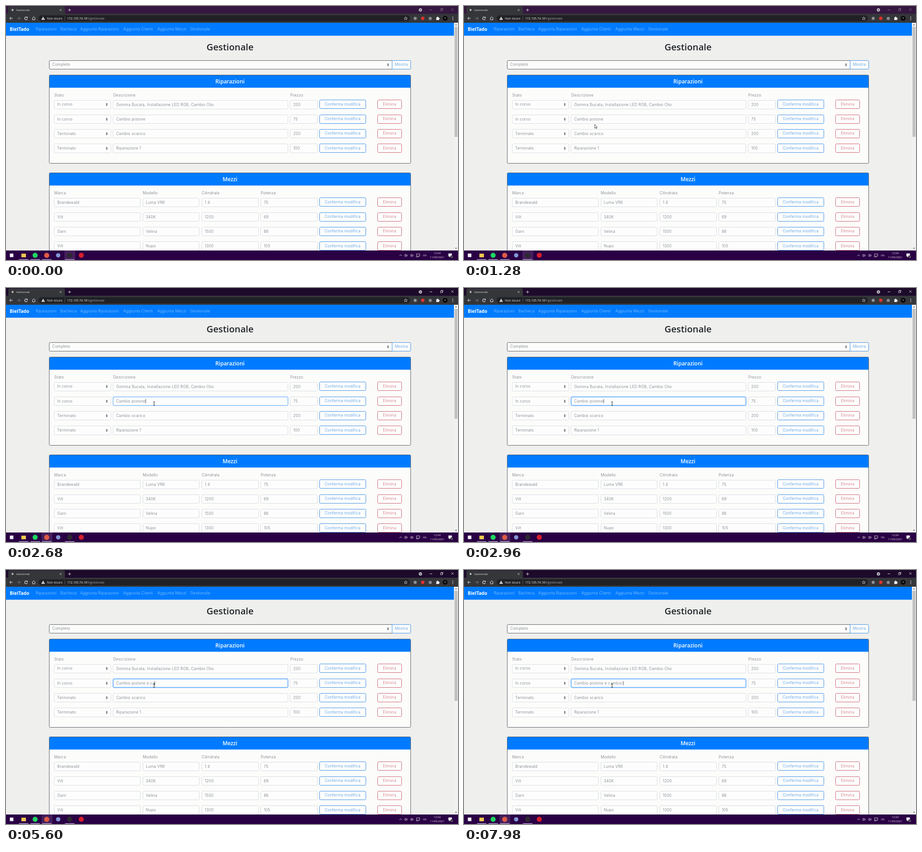
An HTML page with a canvas for the animation above (8000 ms loop, 998 px wide and 561 px high).

```html
<!DOCTYPE html>
<html lang="it">
<head>
<meta charset="utf-8">
<title>Gestionale</title>
<style>
html, body { margin: 0; width: 100%; height: 100%; overflow: hidden; background: #efefed; }
canvas { display: block; width: 998px; height: 561px; }
</style>
</head>
<body>
<canvas id="stage" width="998" height="561"></canvas>
<script>
const ctx = document.getElementById('stage').getContext('2d');
const LOOP = 8000;
const BODY = '300 8.4px Inter, sans-serif';
const HEAD = '"Open Sans", sans-serif';
const UI = '"Open Sans", sans-serif';
const BLUE = '#007bff', LINK = '#3f90e2', RED = '#cc6570', INK = '#6b7178', LINE = '#d9dcdf';
const ROWS = [217.5, 250, 282, 314.3];
const MID = [433.5, 466, 498, 530.3];
const FIELD = { x: 236.5, w: 385.5 };

const repairs = [
  ['In corso', 'Gomma Bucata, Installazione LED RGB, Cambio Olio', '200'],
  ['In corso', 'Cambio pistone', '75'],
  ['Terminato', 'Cambio scarico', '200'],
  ['Terminato', 'Riparazione 1', '100']
];
const vehicles = [
  ['Brandewald', 'Luma VRK', '1.4', '75'],
  ['Vilt', '340K', '1200', '69'],
  ['Garn', 'Velina', '1500', '86'],
  ['Vilt', 'Nupo', '1300', '105']
];
const vehicleCols = [[106.5, 190], [302, 124.5], [432, 125], [562.5, 124.5]];

// Times at which each typed letter appears.
const typed = ' e cambio ';
const keyTimes = [4040, 4340, 4760, 5440, 5600, 6300, 6720, 7000, 7440, 7980];
// Pointer stops: time, x, y.
const path = [[20, 140, 549], [820, 226, 283], [1280, 288.5, 261.5], [1560, 320, 254], [1980, 327, 255.5]];

const clamp = v => Math.max(0, Math.min(1, v));
const snap = v => Math.floor(v) + 0.5;

function text(str, x, y, font = BODY, color = INK, align = 'left', spacing = font === BODY ? 0.28 : 0) {
  ctx.font = font;
  ctx.letterSpacing = spacing + 'px';
  ctx.fillStyle = color;
  ctx.textAlign = align;
  ctx.fillText(str, x, y);
}

function rect(x, y, w, h, color) {
  ctx.fillStyle = color;
  ctx.fillRect(x, y, w, h);
}

// Outlined boxes sit on whole pixels so their lines stay crisp.
function box(x, y, w, h, fill, stroke, r = 2, lw = 1) {
  ctx.beginPath();
  if (stroke) {
    const left = snap(x), top = snap(y);
    ctx.roundRect(left, top, snap(x + w) - left, snap(y + h) - top, r);
  } else {
    ctx.roundRect(x, y, w, h, r);
  }
  if (fill) { ctx.fillStyle = fill; ctx.fill(); }
  if (stroke) { ctx.strokeStyle = stroke; ctx.lineWidth = lw; ctx.stroke(); }
}

function dot(x, y, r, color) {
  ctx.beginPath();
  ctx.arc(x, y, r, 0, 7);
  ctx.fillStyle = color;
  ctx.fill();
}

function poly(points, fill, stroke, lw = 1) {
  ctx.beginPath();
  points.forEach(([x, y], i) => i ? ctx.lineTo(x, y) : ctx.moveTo(x, y));
  if (fill) { ctx.closePath(); ctx.fillStyle = fill; ctx.fill(); }
  if (stroke) { ctx.strokeStyle = stroke; ctx.lineWidth = lw; ctx.stroke(); }
}

function arc(x, y, r, from, to, color, lw = 1) {
  ctx.beginPath();
  ctx.arc(x, y, r, from, to);
  ctx.strokeStyle = color;
  ctx.lineWidth = lw;
  ctx.stroke();
}

function cross(x, y, r, color, lw) {
  poly([[x - r, y - r], [x + r, y + r]], null, color, lw);
  poly([[x + r, y - r], [x - r, y + r]], null, color, lw);
}

function input(x, w, mid, value) {
  box(x, mid - 9.5, w, 19.2, '#fdfdfd', LINE);
  text(value, x + 6.7, mid + 3);
}

function selectMark(x, y) {
  poly([[x - 2, y - 0.6], [x, y - 3], [x + 2, y - 0.6]], '#343a40');
  poly([[x - 2, y + 0.8], [x, y + 3.2], [x + 2, y + 0.8]], '#343a40');
}

function button(x, w, mid, label, color) {
  box(x, mid - 9.8, w, 19, '#fdfdfd', color);
  text(label, x + w / 2, mid + 2.4, BODY, color, 'center');
}

function rowButtons(mid) {
  button(692.5, 101.5, mid, 'Conferma modifica', LINK);
  button(820.5, 53, mid, 'Elimina', RED);
}

function card(y, h, title) {
  box(95.8, y, 798, h, '#fcfcfb', '#5a6066', 2);
  rect(96, y + 0.5, 797, 27.5, BLUE);
  text(title, 494.5, y + 18, '600 12px ' + HEAD, '#fff', 'center');
}

function drawTabs(active) {
  rect(0, 0, 998, 18, active ? '#1d0a2b' : '#35183f');
  box(5, 1, 125, 18, '#35363a', null, [4, 4, 0, 0]);
  dot(14.5, 8.7, 2.2, '#b9babd');
  text('Gestionale', 22.5, 11, '6px ' + UI, '#e4e5e7');
  cross(120.5, 8.8, 2, '#dfe0e2', 0.8);
  poly([[137, 8.8], [143.5, 8.8]], null, '#d5d2da');
  poly([[140.3, 5.6], [140.3, 12]], null, '#d5d2da');
  const tone = active ? '#f2f0f4' : '#877a8e';
  dot(915, 8.7, 3.6, '#bfbcc4');
  poly([[913.3, 8], [916.7, 8], [915, 10.2]], '#17101f');
  poly([[935.5, 8.5], [940.8, 8.5]], null, tone, 0.9);
  box(959.8, 6.2, 3.8, 3.8, null, tone, 0, 0.8);
  poly([[961, 6], [961, 5], [964.7, 5], [964.7, 8.8], [963.8, 8.8]], null, tone, 0.7);
  cross(985.7, 7.7, 2.5, tone, 0.8);
}

function drawToolbar() {
  rect(0, 17, 998, 20, '#35363a');
  box(72, 20.5, 820, 13.5, '#202124', null, 7);
  const light = '#e8e9eb';
  poly([[14.8, 27.2], [8.2, 27.2]], null, light);
  poly([[11.2, 24], [8, 27.2], [11.2, 30.4]], null, light);
  poly([[24.8, 27.2], [31.4, 27.2]], null, '#85868a');
  poly([[28.4, 24], [31.6, 27.2], [28.4, 30.4]], null, '#85868a');
  arc(44.3, 27.3, 3, 0.4, 5.5, light, 1.1);
  poly([[44.8, 26.6], [48, 26.6], [48, 23.5]], light);
  poly([[57.4, 27.4], [61.2, 23.8], [65, 27.4]], null, light);
  poly([[58.7, 27], [58.7, 30.6], [63.7, 30.6], [63.7, 27]], null, light);
  poly([[78, 30.5], [82, 23.6], [86, 30.5]], '#eceded');
  rect(81.6, 26, 0.9, 2.2, '#202124');
  rect(81.6, 28.8, 0.9, 0.9, '#202124');
  text('Non sicuro', 90.3, 29.6, '6.8px ' + UI, '#e8e9eb');
  rect(129.5, 23, 0.8, 8.5, '#6a6b6f');
  text('172.105.74.181', 135, 29.6, '6.75px ' + UI, '#f1f1f2');
  const hostWidth = ctx.measureText('172.105.74.181').width;
  text('/gestionale', 135 + hostWidth, 29.6, '6.75px ' + UI, '#a2a4a8');
  const star = [];
  for (let i = 0; i <= 10; i++) {
    const a = -Math.PI / 2 + i * Math.PI / 5, r = i % 2 ? 1.7 : 3.8;
    star.push([882.6 + r * Math.cos(a), 27.5 + r * Math.sin(a)]);
  }
  poly(star, null, '#d8d9db', 0.8);
  dot(903.5, 27.3, 3.4, '#8d9299');
  dot(920.2, 27.3, 3.7, '#e0332d');
  dot(936.7, 27.5, 3.5, '#85888d');
  rect(950, 25.2, 6, 5.8, light);
  dot(953, 24.9, 1.4, light);
  dot(956.2, 28, 1.4, light);
  dot(969.6, 27.2, 5.4, '#08080a');
  dot(969.6, 26.6, 1.2, '#b0aaa8');
  for (const y of [24.2, 27.2, 30.2]) dot(986.5, y, 0.85, light);
}

function drawPage() {
  rect(0, 37, 989, 504, '#efefed');
  rect(0, 37, 989, 28.6, BLUE);
  text('BielTado', 8.3, 55, '700 10.2px ' + HEAD, '#fff');
  const nav = { Riparazioni: 65.7, Bacheca: 120, 'Aggiunta Riparazioni': 164, 'Aggiunta Clienti': 259, 'Aggiunta Mezzi': 334.3, Gestionale: 406.8 };
  for (const label in nav) text(label, nav[label], 54, BODY, 'rgba(255,255,255,.6)');
  text('Gestionale', 494.7, 98, '600 20.2px ' + HEAD, '#212529', 'center');

  box(95.8, 120.5, 756.5, 19, '#fcfcfb', '#5a6066', [2, 0, 0, 2]);
  text('Completo', 102, 132.4);
  selectMark(843.5, 129.8);
  box(852.3, 120.5, 41.5, 19, '#fcfcfb', LINK, [0, 2, 2, 0]);
  text('Mostra', 873, 132.4, BODY, LINK, 'center');

  card(152.5, 195, 'Riparazioni');
  text('Stato', 106.5, 200.2);
  text('Descrizione', 236.8, 200.2);
  text('Prezzo', 627.7, 200.2);
  repairs.forEach(([state, job, price], i) => {
    const mid = ROWS[i];
    box(106.5, mid - 9.5, 124.5, 19.2, '#fdfdfd', LINE);
    text(state, 113, mid + 2.5);
    selectMark(222.5, mid);
    input(FIELD.x, FIELD.w, mid, i === 1 ? '' : job);
    input(627.5, 59.5, mid, price);
    rowButtons(mid);
  });

  card(368.5, 200, 'Mezzi');
  ['Marca', 'Modello', 'Cilindrata', 'Potenza'].forEach((label, c) => text(label, vehicleCols[c][0], 416.2));
  vehicles.forEach((row, i) => {
    row.forEach((value, c) => input(...vehicleCols[c], MID[i], value));
    rowButtons(MID[i]);
  });

  rect(989, 37, 9, 504, '#f1f1f1');
  rect(990.3, 46, 6.6, 243, '#c1c1c1');
  poly([[991.3, 42.6], [993.6, 40.2], [995.9, 42.6]], '#55585b');
  poly([[991.3, 534.2], [993.6, 536.6], [995.9, 534.2]], '#55585b');
}

function speaker(x) {
  poly([[x - 3.6, 549.8], [x - 2.2, 549.8], [x - 0.2, 548], [x - 0.2, 553.8], [x - 2.2, 552], [x - 3.6, 552]], null, '#e9e6ed', 0.8);
  arc(x, 550.9, 1.6, -0.9, 0.9, '#e9e6ed', 0.7);
  arc(x, 550.9, 3.2, -0.9, 0.9, '#e9e6ed', 0.7);
}

function drawTaskbar(active) {
  rect(0, 540, 998, 21, '#2a0045');
  rect(active ? 78.5 : 129, 540, 24, 21, 'rgba(255,255,255,.12)');
  for (const x of [28.5, 54, 79.5, 130]) rect(x, 559.3, 21, 1.7, '#a68abf');
  rect(8.5, 546.8, 7.8, 7.8, '#f3f1f5');
  rect(34, 547, 10, 8, '#f2c84f');
  dot(64.3, 550.6, 5.6, '#1ed760');
  dot(89.9, 550.7, 5.7, '#dd5a45');
  dot(115.2, 550.7, 4.8, '#8296d6');
  dot(140.5, 550.6, 5.8, '#2c2930');
  dot(166.2, 550.5, 5.6, '#d51f2c');

  const light = '#e9e6ed', small = '6px ' + UI;
  poly([[868.8, 552], [871.4, 549.4], [874, 552]], null, light, 0.9);
  speaker(883);
  speaker(896);
  box(906.2, 547.7, 7, 4.8, null, light, 0, 0.8);
  poly([[905.2, 554.2], [910.8, 554.2]], null, light, 0.8);
  text('ITA', 920.3, 553, small, light);
  text('12:54', 952, 548, small, light, 'center');
  text('11/05/2021', 952, 557.2, small, light, 'center');
  box(976.8, 546.5, 7.8, 6.6, light, null, 0.5);
  poly([[979, 553], [982, 553], [979, 555.3]], light);
  dot(984.6, 554, 3.3, '#2a1c37');
  text('2', 984.6, 556, '5.5px ' + UI, '#fff', 'center');
}

function drawField(t) {
  const mid = ROWS[1], left = FIELD.x + 6.7;
  const focus = clamp((t - 2580) / 300);
  if (focus > 0) {
    box(FIELD.x, mid - 9.5, FIELD.w, 19.2, null, `rgba(0,123,255,${0.25 * focus})`, 3, 3);
    box(FIELD.x, mid - 9.5, FIELD.w, 19.2, null, `rgba(98,172,255,${clamp(focus * 2 + 0.2)})`);
  }
  const count = keyTimes.filter(k => t >= k).length;
  const value = repairs[1][1] + typed.slice(0, count);
  text(value, left, mid + 3);
  if (t >= 2560) rect(Math.round(left + ctx.measureText(value).width - 0.4), mid - 4.5, 0.9, 9, '#33383d');
}

function drawPointer(t) {
  if (t < path[0][0]) return;
  let [, x, y] = path[path.length - 1];
  for (let i = 1; i < path.length; i++) {
    const [t0, x0, y0] = path[i - 1], [t1, x1, y1] = path[i];
    if (t < t1) {
      const p = (t - t0) / (t1 - t0);
      x = x0 + (x1 - x0) * p;
      y = y0 + (y1 - y0) * p;
      break;
    }
  }
  const overText = x > FIELD.x && x < FIELD.x + FIELD.w && ROWS.some(mid => Math.abs(y - mid) < 10);
  if (overText) {
    poly([[x, y - 4], [x, y + 4]], null, '#202326', 1);
    for (const dy of [-4, 4]) poly([[x - 2, y + dy], [x + 2, y + dy]], null, '#202326', 0.8);
  } else {
    const shape = [[0, 0], [0, 8.3], [1.9, 6.6], [3.2, 9.6], [4.5, 9], [3.2, 6.2], [5.7, 6], [0, 0]];
    poly(shape.map(([dx, dy]) => [x + dx, y + dy]), '#fff', '#26292c', 0.8);
  }
}

function frame(now) {
  const t = now % LOOP;
  const active = t >= 2540;
  drawPage();
  drawField(t);
  drawTabs(active);
  drawToolbar();
  drawTaskbar(active);
  drawPointer(t);
}

const start = performance.now();
function tick() {
  frame(performance.now() - start);
  requestAnimationFrame(tick);
}
tick();
</script>
</body>
</html>
```
